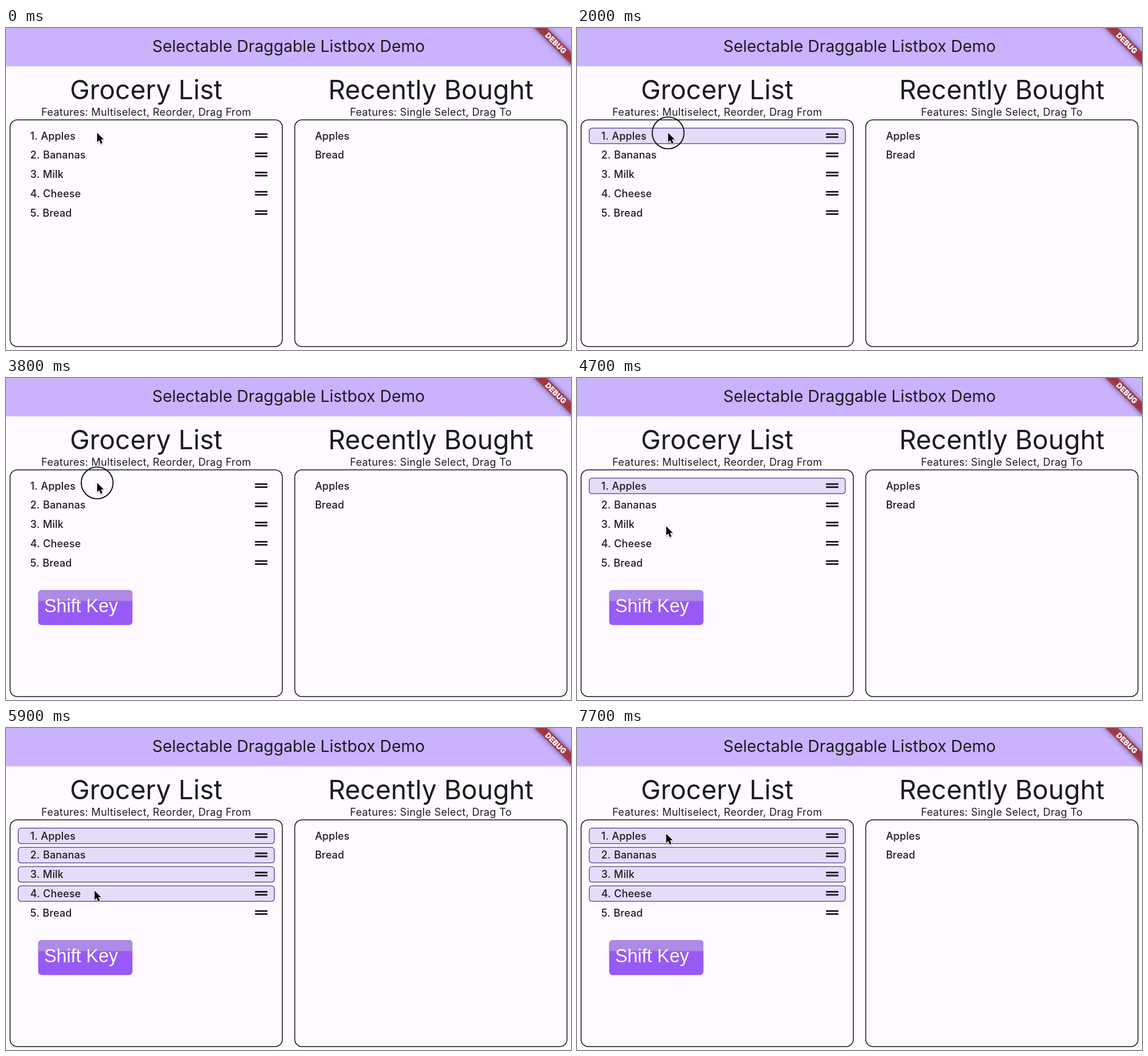
These frames come from a looping animation (992 px wide and 565 px high, 8 s). An HTML page:

```html
<!DOCTYPE html>
<html lang="en">
<head>
<meta charset="utf-8">
<title>Selectable Draggable Listbox Demo</title>
<style>
  html, body { margin: 0; width: 100%; height: 100%; overflow: hidden; background: #fefaff; }
  svg { display: block; width: 992px; height: 565px; }
  text { font-family: Inter, Roboto, sans-serif; font-optical-sizing: none; fill: #1c1b1f; white-space: pre; }
  .mid { text-anchor: middle; }
  .title { font-size: 28.4px; font-weight: 430; }
  .head { font-size: 46.5px; font-weight: 415; }
  .sub { font-size: 18.06px; font-weight: 430; letter-spacing: .36px; }
  .item { font-size: 18.06px; font-weight: 550; letter-spacing: .13px; word-spacing: .8px; }
  .box { fill: none; stroke: #17161a; stroke-width: 1.5; }
  .row { fill: #e6dcfa; stroke: #503a8e; stroke-width: 1.3; }
  .grip { fill: #1c1b1f; }
  .debug { font-size: 13.2px; font-weight: 900; fill: #fff; }
  .key text { font: 32.4px "Liberation Sans", Arial, sans-serif; fill: #fff; }
  .ring { fill: none; stroke: #111; stroke-width: 1.9; }
  .arrow { fill: #000; stroke: #fff; stroke-width: 2.2; stroke-linejoin: round; paint-order: stroke; }
</style>
</head>
<body>
<svg viewBox="0 0 992 565">
  <defs>
    <filter id="soft" x="-30%" y="-150%" width="160%" height="400%"><feGaussianBlur stdDeviation="4.6"/></filter>
    <filter id="drop" x="-60%" y="-40%" width="220%" height="200%">
      <feDropShadow dx="0" dy="1.5" stdDeviation="1.3" flood-opacity=".35"/>
    </filter>
    <clipPath id="keyClip"><rect x="56.5" y="372" width="165.5" height="61.5" rx="6"/></clipPath>
  </defs>

  <rect width="992" height="565" fill="#fefaff"/>
  <rect width="992" height="67.3" fill="#cab2ff"/>
  <text class="mid title" x="496" y="41.5">Selectable Draggable Listbox Demo</text>

  <g transform="translate(996.5 -4.5) rotate(45)">
    <rect x="-51.6" y="36.1" width="103.2" height="15.5" opacity=".5" filter="url(#soft)"/>
    <rect x="-51.6" y="36.1" width="103.2" height="15.5" fill="#b71c1c" fill-opacity=".627"/>
    <text class="mid debug" x="0" y="48.7">DEBUG</text>
  </g>

  <g id="lists"></g>

  <g id="key" class="key">
    <g clip-path="url(#keyClip)">
      <rect x="56" y="371" width="167" height="63" fill="#985af5"/>
      <rect x="56" y="371" width="167" height="20.3" fill="#ad8ae5"/>
    </g>
    <text x="67" y="411">Shift Key</text>
  </g>

  <g id="pointer">
    <circle id="ring" class="ring" r="27.9"/>
    <path class="arrow" filter="url(#drop)" transform="scale(.92)"
      d="M0 0V17.6L4 13.8L7 20.8L10.2 19.4L7.2 12.6H12.6Z"/>
  </g>
</svg>
<script>
const $ = id => document.getElementById(id);
const LOOP = 8000, TICK = 300, FIRST = 500, PITCH = 33.75;

// each click shows the ring for one tick, then leaves `rows` selected
const clicks = [
  { at: 500, rows: 1 },
  { at: 2000, rows: 0 },
  { at: 3800, rows: 1 },
  { at: 5600, rows: 4 }
];
const SHIFT_DOWN = 3800;
const apples = { x: 160, y: 184 }, cheese = { x: 155.5, y: 285.5 }, back = { x: 156.5, y: 185.5 };

const label = (cls, x, y, str) => `<text class="${cls}" x="${x}" y="${y}">${str}</text>`;

function listBox(left, head, sub, items, numbered) {
  const mid = left + 239;
  const rows = items.map((name, i) => {
    const y = 189.2 + i * PITCH;
    const text = label('item', left + 35.4, y + 6.5, numbered ? `${i + 1}. ${name}` : name);
    if (!numbered) return text;
    return `<rect class="row" x="${left + 14.3}" y="${y - 13.5}" width="449.6" height="27.2" rx="5"/>` + text +
      [-4.5, 0.8].map(dy => `<rect class="grip" x="437.2" y="${y + dy}" width="21.8" height="2.9"/>`).join('');
  });
  return label('mid head', mid, 124.8, head) + label('mid sub', mid, 154.2, sub) +
    `<rect class="box" x="${left}" y="161.2" width="478" height="397.8" rx="12.5"/>` + rows.join('');
}

$('lists').innerHTML =
  listBox(7.2, 'Grocery List', 'Features: Multiselect, Reorder, Drag From',
    ['Apples', 'Bananas', 'Milk', 'Cheese', 'Bread'], true) +
  listBox(507, 'Recently Bought', 'Features: Single Select, Drag To', ['Apples', 'Bread'], false);

const rowRects = [...document.querySelectorAll('.row')];
const show = (el, on) => { el.style.visibility = on ? 'visible' : 'hidden'; };

function glide(from, to, t, start, length, power) {
  const u = Math.min(1, Math.max(0, (t - start) / length));
  const p = 1 - (1 - u) ** power;
  return { x: from.x + (to.x - from.x) * p, y: from.y + (to.y - from.y) * p };
}

const pointerAt = t => t < 6800
  ? glide(apples, cheese, t, 4100, 1200, 2)
  : glide(cheese, back, t, 6800, 900, 3);

function draw() {
  const now = performance.now() % LOOP;
  const t = FIRST + Math.floor((now - FIRST) / TICK) * TICK;
  const { x, y } = pointerAt(t);
  const picked = clicks.findLast(c => t > c.at)?.rows ?? 0;

  $('pointer').setAttribute('transform', `translate(${x} ${y})`);
  show($('ring'), clicks.some(c => c.at === t));
  show($('key'), t >= SHIFT_DOWN);
  rowRects.forEach((r, i) => show(r, i < picked));
  requestAnimationFrame(draw);
}
draw();
</script>
</body>
</html>
```
